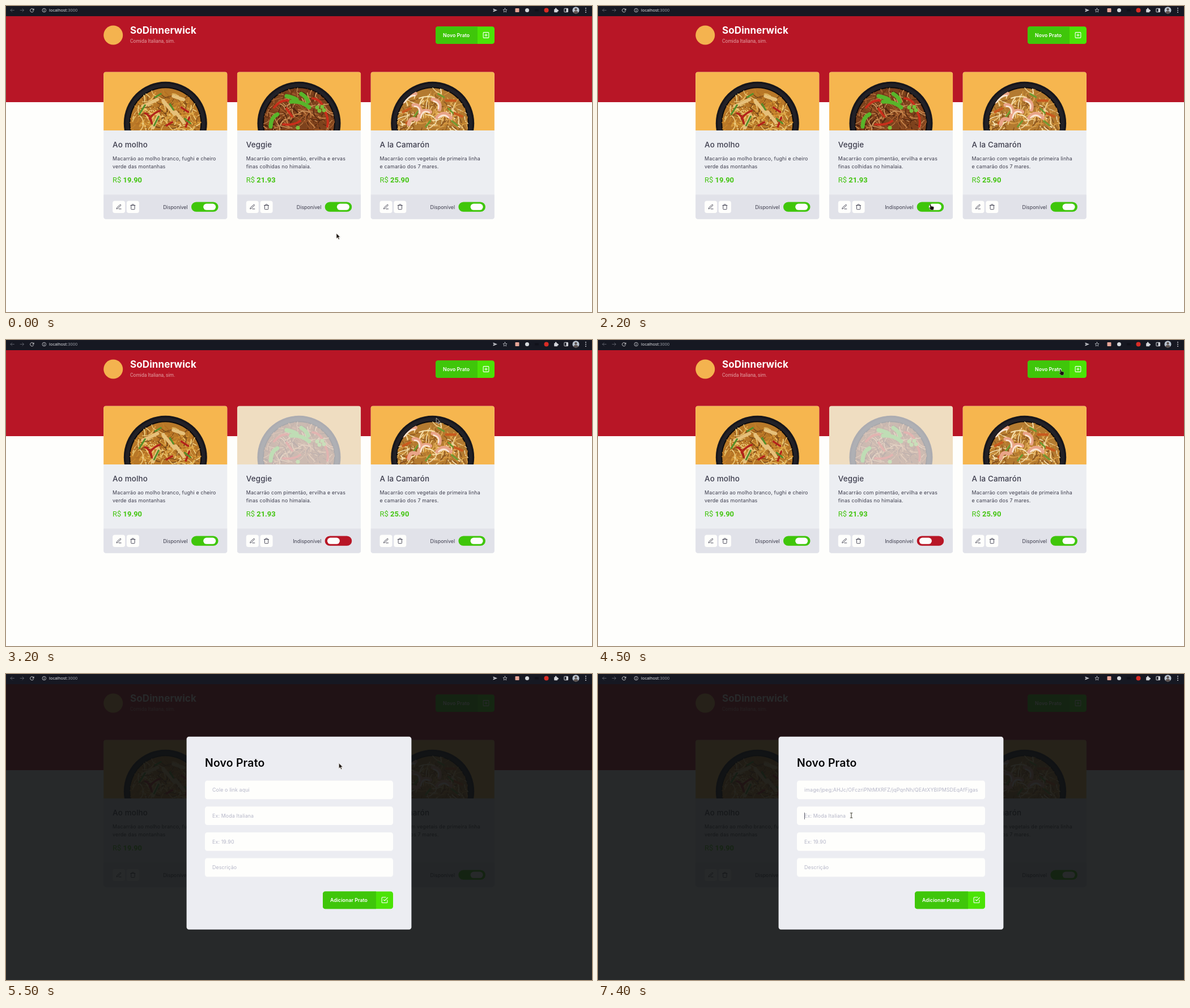
An HTML page for the animation above (8 s loop, 1034 px wide and 541 px high).

```html
<!DOCTYPE html>
<html lang="pt">
<head>
<meta charset="utf-8">
<title>Novo Prato</title>
<style>
html, body { margin: 0; width: 100%; height: 100%; overflow: hidden; background: #fefefc; }
svg { display: block; width: 100vw; height: 100vh; }
text { font-family: Inter, sans-serif; font-size: 8.9px; fill: #3d3d4d; white-space: pre; }
.name { font-size: 13.4px; font-weight: 500; letter-spacing: .17px; }
.desc { letter-spacing: .16px; }
.price { font-family: Roboto, sans-serif; font-size: 12.95px; fill: #43c510; }
.price tspan { font-weight: 700; }
.brand { font-size: 17px; font-weight: 700; letter-spacing: .1px; fill: #fff; }
.sub { font-family: Roboto, sans-serif; font-size: 8.5px; fill: #e3a3a6; }
.btn { font-size: 8.7px; font-weight: 600; letter-spacing: .08px; fill: #fff; }
.head { font-size: 19.4px; font-weight: 600; letter-spacing: .2px; fill: #060608; }
.hint { letter-spacing: .1px; fill: #b5b6c8; }
.url { font-family: "Noto Sans", sans-serif; font-size: 7.4px; fill: #e4e5e9; }
.icon { fill: none; stroke-width: 2; stroke-linecap: round; stroke-linejoin: round; }
</style>
</head>
<body>
<svg id="stage" viewBox="0 0 1034 541" preserveAspectRatio="none"></svg>
<script>
const LOOP = 8000, STEP = 100;
const GREEN = [63, 198, 10], RED = [184, 22, 38];
const rgb = c => `rgb(${c.map(Math.round)})`;
const mix = (a, b, p) => a + (b - a) * p;

const rect = (x, y, w, h, fill, r = 0, extra = '') =>
  `<rect x="${x}" y="${y}" width="${w}" height="${h}" rx="${r}" fill="${fill}" ${extra}/>`;
const circle = (x, y, r, fill, extra = '') =>
  `<circle cx="${x}" cy="${y}" r="${r}" fill="${fill}" ${extra}/>`;
const text = (x, y, cls, str, extra = '') =>
  `<text x="${x}" y="${y}" class="${cls}" ${extra}>${str}</text>`;
const line = (d, color, w) =>
  `<path d="${d}" fill="none" stroke="${color}" stroke-width="${w}" stroke-linecap="round" stroke-linejoin="round"/>`;
// 24-unit icon centred on a point
const icon = (d, x, y, size, color) =>
  `<path class="icon" d="${d}" stroke="${color}" transform="translate(${x - size / 2} ${y - size / 2}) scale(${size / 24})"/>`;

const ICONS = {
  edit: 'M12 20h9M16.5 3.5a2.1 2.1 0 0 1 3 3L7 19l-4 1 1-4z',
  trash: 'M3 6h18M19 6v14a2 2 0 0 1-2 2H7a2 2 0 0 1-2-2V6m3 0V4a2 2 0 0 1 2-2h4a2 2 0 0 1 2 2v2',
  plus: 'M5 3h14a2 2 0 0 1 2 2v14a2 2 0 0 1-2 2H5a2 2 0 0 1-2-2V5a2 2 0 0 1 2-2zM12 8v8M8 12h8',
  check: 'M9 11l3 3L22 4M21 12v7a2 2 0 0 1-2 2H5a2 2 0 0 1-2-2V5a2 2 0 0 1 2-2h11',
  back: 'M21 12H4M11 5l-7 7 7 7',
  forward: 'M3 12h17M13 5l7 7-7 7',
  reload: 'M20 5v6h-6M20 11a8.5 8.5 0 1 0-1 6',
  star: 'M12 2l3 7 7 .6-5.3 4.8 1.6 7.1L12 17.7l-6.3 3.8 1.6-7.1L2 9.6 9 9z'
};

function random(seed) {
  return () => (seed = (seed * 16807) % 2147483647) / 2147483647;
}

// Each dish: noodle tones, then strokes as [path, colour, width] around the plate centre
const DISHES = [
  {
    name: 'Ao molho', price: '19.90', base: '#b87828',
    desc: ['Macarrão ao molho branco, fughi e cheiro', 'verde das montanhas'],
    tones: ['#d99a38', '#e7bd62', '#b26d20', '#efcf82', '#7c4a18', '#c98429'],
    bits: [
      ['M-40 -30l26 -12M-4 -40l20 24M14 -48l18 6M-12 -14l-10 22M18 -20l14 18', '#e6c07a', 6],
      ['M-36 -18q10 4 12 18M-10 -22q-12 4 -18 14M28 -28l12 8M36 6l6 -16M2 4l10 -6', '#b3241b', 3.5],
      ['M-46 -16l10 -16M-18 -46l10 -6M-20 4l8 -16M34 -8l10 8M8 -34l6 10', '#55902b', 3]
    ]
  },
  {
    name: 'Veggie', price: '21.93', base: '#7d421d',
    desc: ['Macarrão com pimentão, ervilha e ervas', 'finas colhidas no himalaia.'],
    tones: ['#a55f2e', '#6e3413', '#c58248', '#8d4a20', '#d29b62', '#4f240f'],
    bits: [
      ['M40 -28q14 14 10 34M-44 -28q12 -14 24 -12M-28 2q20 2 30 -6M24 -44q14 2 18 14M-22 -26l10 14', '#c92e1b', 4],
      ['M-22 -48q10 2 18 6M-14 -38Q4 -40 18 -28M-50 6Q-50 -10 -38 -16M4 -52q10 6 12 14', '#58b52a', 7],
      ['M32 -28h.1M41 -29h.1M36 -22h.1M44 -23h.1M-2 8h.1', '#79bd38', 7]
    ]
  },
  {
    name: 'A la Camarón', price: '25.90', base: '#b37a30',
    desc: ['Macarrão com vegetais de primeira linha', 'e camarão dos 7 mares.'],
    tones: ['#e3ad54', '#f3d594', '#c5852f', '#f7e2b0', '#8d5620', '#d89b45'],
    bits: [
      ['M-52 -20l12 -6M24 -40l16 0M38 -18l14 6M-46 0l8 -8', '#c85a1e', 4.5],
      ['M-34 -10l12 -16M10 -52l10 6M34 -4l10 8M-12 6l8 -10M28 -26l8 8', '#6f9a31', 3],
      ['M-52 -38q10 -16 22 -14M-34 -32q14 -2 12 16M-24 -8q4 -20 20 -12M0 -42q16 2 12 18M8 -10q12 -14 24 0M-42 2q2 -14 14 -8', '#e9a488', 6.5],
      ['M-50 -37q10 -13 19 -12M-32 -30q10 0 9 12M-21 -10q4 -15 15 -9M2 -39q11 3 8 13M11 -10q9 -8 17 0', '#fae4d2', 2.8]
    ]
  }
];

function plate(dish, seed) {
  const rnd = random(seed), fix = (...v) => v.map(n => n.toFixed(1)).join(' ');
  let out = circle(0, 0, 73.5, '#17161b') + circle(0, 0, 70, '#222127') + circle(0, 0, 64, '#0d0b0c') +
    '<g clip-path="url(#food)">' + circle(0, 0, 62, dish.base);
  for (let n = 0; n < 190; n++) {
    const a = Math.PI * (0.92 + rnd() * 1.16), r = 60 * Math.sqrt(rnd());
    const h = rnd() * 2 * Math.PI, len = 10 + rnd() * 18, bend = (rnd() - .5) * .9;
    const dx = len * Math.cos(h), dy = len * Math.sin(h);
    const tone = dish.tones[Math.floor(rnd() * dish.tones.length)];
    const d = `M${fix(r * Math.cos(a), r * Math.sin(a) + 6)}q${fix(dx / 2 - dy * bend, dy / 2 + dx * bend, dx, dy)}`;
    out += line(d, tone, fix(1 + rnd()));
  }
  return out + dish.bits.map(b => line(...b)).join('') + '</g>';
}

function card(dish, i) {
  const tool = (x, name) => rect(x, 344.5, 22, 21.5, '#fefefc', 4) + icon(ICONS[name], x + 11, 355.2, 10.8, '#3d3d4d');
  return `<g transform="translate(${172.1 + 235.7 * i} 0)"><g clip-path="url(#card)">
    ${rect(0, 116.5, 218.4, 260.3, '#eceef2')}
    <g id="photo${i}">${rect(0, 116.5, 218.4, 103.5, '#f6b64f')}
      <g clip-path="url(#top)"><g transform="translate(109.2 207.3)">${plate(dish, 71 + i * 911)}</g></g></g>
    ${rect(0, 333.5, 218.4, 43.5, '#e1e2e9')}</g>
    ${text(16, 250, 'name', dish.name)}
    ${dish.desc.map((s, n) => text(16, 273.3 + n * 13.45, 'desc', s)).join('')}
    ${text(16, 312.4, 'price', `R$ <tspan>${dish.price}</tspan>`)}
    ${tool(16, 'edit')}${tool(40.8, 'trash')}
    ${text(148.6, 358.5, 'state', 'Disponível', `id="state${i}" text-anchor="end"`)}
    ${rect(154.9, 346.5, 47.5, 17.3, rgb(GREEN), 8.65, `id="track${i}"`)}
    ${rect(176.1, 349.6, 22, 11.2, '#fefefc', 5.6, `id="knob${i}"`)}
  </g>`;
}

function button(x, y, w, label, glyph) {
  return rect(x, y, w, 30.8, '#4be306', 4.3) +
    `<path d="M${x + w - 30} ${y}v30.8h${34.3 - w}a4.3 4.3 0 0 1-4.3-4.3v-22.2a4.3 4.3 0 0 1 4.3-4.3z" fill="${rgb(GREEN)}"/>` +
    text(x + 13, y + 18.5, 'btn', label) + icon(ICONS[glyph], x + w - 15, y + 15.3, 13, '#fff');
}

function browserBar() {
  const dim = '#6f727b', pale = '#d3d5da';
  return rect(0, 0, 1034, 18, '#161822') +
    icon(ICONS.back, 11, 7.5, 9, dim) + icon(ICONS.forward, 28.5, 7.5, 9, dim) +
    icon(ICONS.reload, 46, 7.5, 9, '#fff') +
    circle(67.3, 7.6, 3.3, 'none', `stroke="${pale}" stroke-width=".8"`) + line('M67.3 7.3v2M67.3 5.7v.1', pale, .8) +
    text(76, 10.2, 'url', 'localhost<tspan fill="#9a9da5">:3000</tspan>') +
    '<path d="M859.5 4.5l7.5 3-7.5 3 .4-2.4 3.6-.6-3.6-.6z" fill="#c4c6cc"/>' +
    icon(ICONS.star, 880.5, 7.5, 8.5, pale) +
    rect(898.5, 4, 7, 7, '#e6a596', 1) + circle(919.5, 7.5, 3.5, '#d5d8dc') +
    rect(933, 5.5, 7, 4, '#10111a', 1) + circle(953.5, 7.5, 4, '#d92c25') +
    rect(967.2, 5.4, 6, 5.8, pale, .8) + circle(970.2, 5, 1.4, pale) + circle(973.6, 8.2, 1.4, pale) +
    rect(985, 4.3, 6.6, 6.4, 'none', .6, `stroke="${pale}"`) + rect(988.5, 4.3, 3, 6.4, pale) +
    circle(1005.5, 7.5, 6, '#b9c3cf') + circle(1005.5, 6, 2.2, '#5c5250') +
    '<path d="M1001.3 11.7a4.3 3.6 0 0 1 8.4 0a6 6 0 0 1-8.4 0z" fill="#5c5250"/>' +
    [4, 7.5, 11].map(y => circle(1023, y, .9, pale)).join('');
}

const HINTS = ['Cole o link aqui', 'Ex: Moda Italiana', 'Ex: 19.90', 'Descrição'];
const fieldY = n => 188.5 + 45.7 * n;

// Filler for the pasted link: a file type followed by random letters
function filler(length) {
  const rnd = random(29);
  let s = 'image/jpeg;';
  while (s.length < length) {
    const letter = String.fromCharCode(65 + Math.floor(rnd() * 26));
    s += rnd() < .08 ? '/' : rnd() < .3 ? letter.toLowerCase() : letter;
  }
  return s;
}
const PASTED = filler(62);

function modal() {
  return '<g id="modal">' + rect(0, 18, 1034, 523, '#101213', 0, 'opacity=".9"') +
    rect(318.6, 110.8, 396.8, 341, '#ecedf2', 4.3) + text(351, 163.7, 'head', 'Novo Prato') +
    HINTS.map((s, n) => rect(351, fieldY(n), 332, 32.8, '#fefefc', 4.3) +
      text(364, fieldY(n) + 19.6, 'hint', s, `id="hint${n}" clip-path="url(#field)"`)).join('') +
    rect(364, 0, .9, 12, '#55555f', 0, 'id="caret"') +
    button(559, 384.4, 124, 'Adicionar Prato', 'check') + '</g>';
}

const CURSORS = {
  arrow: '<path d="M0 0v9.3l2.2-2 1.6 3.5 1.6-.7-1.6-3.4h3z" fill="#1b1512" stroke="#e9e4dc" stroke-width=".7"/>',
  hand: '<path d="M.3 1Q1.3-.3 2.1 1l.9 3.3 1-.3 1 .5 1-.1.7.7q1 .1 1 1.2l-.3 2-.7 2.4H2.5L-.7 6.8q.1-1.2 1.2-.8l.8.7z" fill="#17120f" stroke="#cfc9c0" stroke-width=".4"/>',
  beam: line('M-1.8-4.3h3.6M-1.8 4.3h3.6M0-4.3v8.6', '#4b4a3e', 1.1)
};

const stage = document.getElementById('stage');
stage.innerHTML = `<defs>
    <clipPath id="card">${rect(0, 116.5, 218.4, 260.3, '#000', 4.3)}</clipPath>
    <clipPath id="top">${rect(0, 116.5, 218.4, 103.5, '#000')}</clipPath>
    <clipPath id="food">${circle(0, 0, 63, '#000')}</clipPath>
    <clipPath id="field">${rect(360, 180, 310.5, 190, '#000')}</clipPath>
  </defs>` +
  rect(0, 0, 1034, 541, '#fefefc') + rect(0, 18, 1034, 152, rgb(RED)) + browserBar() +
  circle(189.2, 51.5, 17, '#f4b34f') + text(219, 49.3, 'brand', 'SoDinnerwick') +
  text(219, 64.8, 'sub', 'Comida Italiana, sim.') +
  button(758, 36.2, 104, 'Novo Prato', 'plus') + DISHES.map(card).join('') + modal() +
  '<g id="cursor">' + Object.entries(CURSORS).map(([k, v]) => `<g id="${k}">${v}</g>`).join('') + '</g>';

const el = id => document.getElementById(id);
const set = (id, attr, v) => el(id).setAttribute(attr, v);
const show = (id, on) => set(id, 'visibility', on ? 'visible' : 'hidden');

// Pointer moves: first step, last step, end x, end y
const MOVES = [
  [400, 400, 582.5, 401.5], [600, 900, 567, 320], [1100, 1200, 518, 276], [1300, 1400, 541, 310],
  [1600, 1900, 585, 350], [2700, 2900, 637, 255], [3100, 3300, 802, 97], [3400, 3400, 790, 87],
  [3600, 3800, 814.5, 51.5], [4600, 4600, 815.5, 51], [5100, 5100, 814.5, 50.5],
  [5300, 5700, 464, 216], [5800, 5800, 460.3, 210.5], [7100, 7400, 447, 250]
];

function pointer(t) {
  let x = 583, y = 402;
  for (const [a, b, ex, ey] of MOVES) {
    if (t < a) break;
    const p = Math.min(1, (t - a + STEP) / (b - a + STEP)), e = p * p * (3 - 2 * p);
    x = mix(x, ex, e);
    y = mix(y, ey, e);
  }
  return [x, y];
}

const inside = (x, y, l, t, r, b) => x >= l && x <= r && y >= t && y <= b;

function shape(x, y, open) {
  if (open) return HINTS.some((_, n) => inside(x, y, 351, fieldY(n), 683, fieldY(n) + 32.8)) ? 'beam' : 'arrow';
  return inside(x, y, 563, 346, 610, 364) || inside(x, y, 758, 36, 862, 67) ? 'hand' : 'arrow';
}

function draw(time) {
  const t = Math.floor(time % LOOP / STEP) * STEP;
  const open = t >= 4600;

  const off = t <= 2200 ? 0 : t === 2300 ? .27 : t === 2400 ? .77 : 1;
  el('state1').textContent = t >= 2200 ? 'Indisponível' : 'Disponível';
  set('track1', 'fill', rgb(GREEN.map((c, i) => mix(c, RED[i], off))));
  set('knob1', 'x', mix(176.1, 159.1, off));
  set('photo1', 'opacity', mix(1, .3, off));

  show('modal', open);
  el('hint0').textContent = t >= 7100 ? PASTED : HINTS[0];
  const second = t >= 7400;
  show('caret', second || (t >= 6000 && t < 6500));
  set('caret', 'y', second ? 245 : 199);

  const [x, y] = pointer(t), kind = shape(x, y, open);
  set('cursor', 'transform', `translate(${x} ${y})`);
  for (const k in CURSORS) show(k, k === kind);
}

const start = performance.now();
function tick() {
  draw(performance.now() - start);
  requestAnimationFrame(tick);
}
tick();
</script>
</body>
</html>
```
